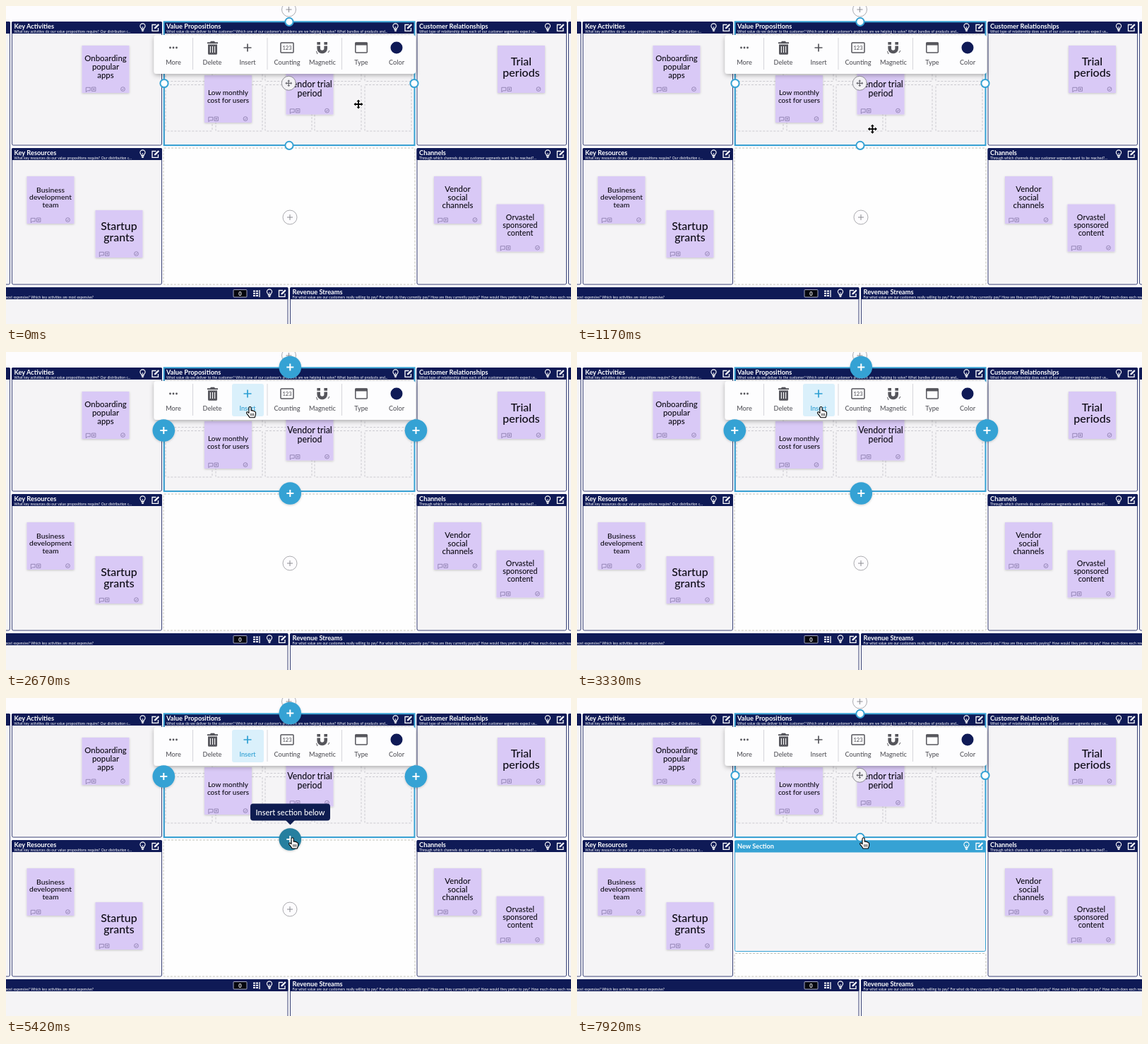
Animation, 800 px wide and 450 px high, one loop 8 s. Source, as an HTML page:

```html
<!DOCTYPE html>
<html lang="en">
<head>
<meta charset="utf-8">
<title>Insert section</title>
<style>
html, body { margin: 0; width: 100%; height: 100%; overflow: hidden; background: #fdfcfe; }
svg { display: block; width: 100vw; height: 100vh; }
text { font-family: Lato, "Open Sans", sans-serif; font-weight: 500; white-space: pre; }
.title { fill: #fff; font-weight: 700; }
.sub { fill: #fff; font-weight: 400; word-spacing: .05em; }
</style>
</head>
<body>
<svg id="stage" viewBox="0 0 800 450">
  <defs>
    <filter id="soft" x="-20%" y="-20%" width="140%" height="150%">
      <feDropShadow dx="0" dy="1" stdDeviation="1.5" flood-color="#000" flood-opacity=".2"/>
    </filter>
    <filter id="bar" x="-5%" y="-20%" width="110%" height="160%">
      <feDropShadow dx="0" dy="2" stdDeviation="3" flood-color="#000" flood-opacity=".3"/>
    </filter>
    <g id="bulb" fill="none" stroke="#fff" stroke-width="1.1">
      <path d="M-1.8 2V.9C-3 0-3.6-1-3.6-2a3.6 3.6 0 0 1 7.2 0C3.6-1 3 0 1.8.9V2Z"/>
      <path d="M-1.8 3.4h3.6M-1.2 4.9h2.4M0 1v-2.2"/>
    </g>
    <g id="edit" fill="none" stroke="#fff" stroke-width="1.3">
      <path d="M1-4H-4.5V4.8H4V.5"/>
      <path d="M-1.7 2.1-1.2-.3 4-5.3 5.6-3.7.6 1.5Z" fill="#fff" stroke="none"/>
    </g>
    <g id="marks" fill="none" stroke="#8677a8" stroke-width=".8">
      <path d="M5.8 59.3h6v4.5H8L5.8 65.6Z"/>
      <path d="M14 59h5.4v5.4H14ZM16.7 60.4v2.6M15.4 61.7H18"/>
      <circle cx="58" cy="61.6" r="2.9"/>
      <path d="M56.6 61.6l1 1.1 1.8-2.1"/>
    </g>
    <g id="hand">
      <path d="M-1.6 9V1.6a1.6 1.6 0 0 1 3.2 0V5.5Q3.2 4.5 4 5.9 5.7 5.2 6.2 6.8 8 6.7 8 8.5V11Q7.6 13 6.6 15.2H-.5Q-2 12.5-4.6 9.6-5.5 7.8-4 7.3-2.8 7.3-1.6 9Z"
        fill="#fff" stroke="#000" stroke-width="1.1" stroke-linejoin="round"/>
      <path d="M1.2 9.3v3.6M3.2 9.3v3.6M5.2 9.3v3.6" stroke="#000" stroke-width=".8"/>
    </g>
    <path id="cross" d="M0-6.6 2.6-3.7H.9V-.9H3.7V-2.6L6.6 0 3.7 2.6V.9H.9V3.7H2.6L0 6.6-2.6 3.7H-.9V.9H-3.7V2.6L-6.6 0-3.7-2.6V-.9H-.9V-3.7H-2.6Z"
      stroke-linejoin="round"/>
  </defs>
</svg>
<script>
const LOOP = 8000, STEP = 1000 / 12;
const NAVY = '#0f1a56', EDGE = '#3a4377', BLUE = '#36a2d4', DARK = '#257f9f', GRAY = '#56565c', PANEL = '#f5f4f6';
const BUTTONS_IN = 2500, CLICK = 6950, SECTION_IN = 7240;

const stage = document.getElementById('stage');
const $ = id => document.getElementById(id);

const text = (x, y, s, size, extra = '') =>
  `<text x="${x}" y="${y}" font-size="${size}" ${extra}>${s}</text>`;
const rect = (x, y, w, h, fill, extra = '') =>
  `<rect x="${x}" y="${y}" width="${w}" height="${h}" fill="${fill}" ${extra}/>`;
const use = (id, x, y, extra = '') => `<use href="#${id}" x="${x}" y="${y}" ${extra}/>`;
const plus = (x, y, r, color, w) =>
  `<path d="M${x - r} ${y}h${2 * r}M${x} ${y - r}v${2 * r}" stroke="${color}" stroke-width="${w}"/>`;
const dashed = (x, y, w, h, fill = 'none', color = '#cbcad0') =>
  rect(x, y, w, h, fill, `stroke="${color}" stroke-dasharray="3 2" rx="1"`);

function panel(x, y, w, h, title, sub, color = NAVY, edge = EDGE) {
  return rect(x, y, w, h, PANEL, `stroke="${edge}" rx="2"`) +
    rect(x - .5, y - .5, w + 1, 17, color, 'rx="1.5"') +
    text(x + 3, y + 9.2, title, 9.3, 'class="title"') +
    text(x + 3, y + 15.2, sub, 5.05, 'class="sub"');
}
const tools = (x, y) => use('bulb', x, y) + use('edit', x + 18, y);

function sticky(x, y, size, base, lead, ...lines) {
  return rect(x, y, 67, 67, '#d9c9f6', 'filter="url(#soft)"') + use('marks', x, y) +
    lines.map((s, i) => text(x + 33.5, base + i * lead, s, size, 'text-anchor="middle" fill="#0c0a14"')).join('');
}

function addCircle(x, y) {
  return `<circle cx="${x}" cy="${y}" r="10" fill="#fdfcfe" stroke="#a3a3a8" stroke-width=".9"/>` +
    plus(x, y, 4, '#8c8c92', 1);
}

function board() {
  const cells = [226, 297, 367, 437, 508].map(x => dashed(x, 41, 66, 65.5) + dashed(x, 111.5, 66, 65.5)).join('');
  return addCircle(400.5, 5) +
    panel(-200, 22.5, 205.5, 371.5, '', '') + panel(796.5, 22.5, 200, 371.5, '', '') +
    panel(8.5, 22.5, 212, 174.5, 'Key Activities', 'What key activities do our value propositions require? Our distribution c...') +
    panel(582, 22.5, 211.5, 174.5, 'Customer Relationships', 'What type of relationship does each of our customer segments expect us...') +
    panel(8.5, 201.5, 212, 192.5, 'Key Resources', 'What key resources do our value propositions require? Our distribution c...') +
    panel(582, 201.5, 211.5, 192.5, 'Channels', 'Through which channels do our customer segments want to be reached?...') +
    panel(-200, 398.5, 599, 90, '', '') +
    text(124, 413.7, 'What are the most important costs? Which key resources are most expensive? Which key activities are most expensive?', 4.9, 'class="sub" text-anchor="end"') +
    panel(402.5, 398.5, 600, 90, 'Revenue Streams', 'For what value are our customers really willing to pay? For what do they currently pay? How are they currently paying? How would they prefer to pay? How much does each revenue stream contribute?') +
    rect(322, 401.5, 19, 10.5, '#05070f', 'stroke="#c9cbe0" stroke-width=".8" rx="1"') +
    text(331.5, 409.7, '0', 7.5, 'class="title" text-anchor="middle"') +
    '<path d="M350 402.5h3v2h-3ZM354 402.5h3v2h-3ZM350 405.7h3v2h-3ZM354 405.7h3v2h-3ZM350 409h3v2h-3ZM354 409h3v2h-3Z" fill="#fff"/>' +
    '<path d="M359 402v10" stroke="#fff" stroke-width="1.3"/>' +
    tools(373, 406.5) + tools(193.5, 30.5) + tools(767, 30.5) + tools(193.5, 209.5) + tools(767, 209.5) +
    `<g id="empty">${dashed(223, 201, 356, 193, '#fefefe', '#c4c4b8')}${addCircle(402, 299)}</g>` +
    `<g id="fresh">${dashed(223, 361.5, 356, 32.5, '#fefefe', '#c4c4b8')}${panel(223.5, 202, 355, 156.5, '', '', BLUE, BLUE)}` +
    text(227, 213.2, 'New Section', 9.2, 'class="title"') + tools(551.5, 209.5) + '</g>' +
    panel(224, 22.5, 354.5, 174.5, 'Value Propositions', "What value do we deliver to the customer? Which one of our customer's problems are we helping to solve? What bundles of products and...") +
    tools(551.5, 30.5) + cells +
    rect(223.7, 22.3, 354.8, 174.8, 'none', `stroke="${BLUE}" stroke-width="2"`) +
    sticky(107.5, 56, 11.4, 77.6, 12.1, 'Onboarding', 'popular', 'apps') +
    sticky(696, 56, 16, 84, 16, 'Trial', 'periods') +
    sticky(281, 98, 10, 126.4, 10.4, 'Low monthly', 'cost for users') +
    sticky(396.5, 86.5, 12.4, 114.7, 12.8, 'Vendor trial', 'period') +
    sticky(29.5, 241, 10.4, 263.8, 10.4, 'Business', 'development', 'team') +
    sticky(126.5, 289, 15.9, 316.7, 15.8, 'Startup', 'grants') +
    sticky(606, 241, 11.4, 263.1, 11.6, 'Vendor', 'social', 'channels') +
    sticky(694.5, 280.5, 10.8, 303.2, 10.8, 'Orvastel', 'sponsored', 'content') +
    '<path id="arrows" d="M392.5 111v19l-9-9.5ZM467.5 111v19l9-9.5Z" fill="#c6c5cb"/>';
}

function toolbar() {
  const label = (x, s, extra = '') => text(x, 83.3, s, 9.2, `text-anchor="middle" ${extra}`);
  const dots = [232.5, 237, 241.5].map(x => `<circle cx="${x}" cy="59" r="1.4"/>`).join('');
  return rect(209.5, 41, 370.5, 55, '#fdfdfe', 'rx="4" filter="url(#bar)"') +
    '<path d="M264.5 45v45M370 45v45M475.5 45v45" stroke="#d5d5da"/>' +
    rect(320, 45, 45, 46, '#daf0fb', 'id="glow" rx="3"') +
    `<g fill="${GRAY}">${dots}
      <path d="M285 51.2h4l1-1.4h5l1 1.4h4v2h-15ZM286 54.6h13v12.6q0 1.6-1.6 1.6h-9.8q-1.6 0-1.6-1.6Z"/>
      <path d="M289.4 57v9M292.5 57v9M295.6 57v9" stroke="#fdfdfe" stroke-width="1.1"/>
      <rect x="389" y="52" width="18" height="14" rx="1" fill="none" stroke="${GRAY}" stroke-width="1.5"/>
      ${text(398, 62, '123', 7.6, 'text-anchor="middle" font-weight="700"')}
      <path d="M442.7 56.5V60a5 5 0 0 0 10 0V56.5" fill="none" stroke="${GRAY}" stroke-width="4.6"/>
      <path d="M440.4 51h4.6v3.8h-4.6ZM450.4 51h4.6v3.8h-4.6Z"/>
      <path d="M441 68l-1.5-4M456 66l2-3" stroke="${GRAY}"/>
      <rect x="494.8" y="52" width="16.5" height="14" rx="1" fill="none" stroke="${GRAY}" stroke-width="1.5"/>
      <path d="M494.5 51.5h17v4h-17Z"/>
      <circle cx="553" cy="59" r="8.5" fill="${NAVY}"/>
      ${label(237, 'More')}${label(292, 'Delete')}${label(398, 'Counting')}
      ${label(448, 'Magnetic')}${label(503, 'Type')}${label(553, 'Color')}</g>` +
    `<g id="insert">${plus(342, 59, 5.5, 'currentColor', 1.7)}${label(342, 'Insert', 'fill="currentColor"')}</g>`;
}

function handles() {
  const dots = [[401, 22.3], [224, 109.5], [578, 109.5], [401, 197.3]]
    .map(([x, y]) => `<circle cx="${x}" cy="${y}" r="5.6" fill="#fff" stroke="${BLUE}" stroke-width="2"/>`).join('');
  return `<g id="handles">${dots}
    <circle cx="400.3" cy="109.3" r="10" fill="#f3f2f5" stroke="#8e8e94"/>
    <use href="#cross" transform="translate(400.3 109.3) scale(.75)" fill="#6b6b72"/></g>`;
}

const spots = [[402.3, 21.5], [223.3, 111], [580.5, 111], [402.3, 200]];
const adders = () => spots.map(([x, y], i) =>
  `<g id="add${i}"><circle r="15.8" fill="${BLUE}" filter="url(#soft)"/>${plus(0, 0, 5, '#fff', 2)}</g>`).join('');

// dir 1: bubble above its anchor, pointing down; -1: below, pointing up
function tip(id, x, w, s, dir) {
  return `<g id="${id}">` + rect(x - w / 2, -12, w, 24, '#0e1c50', 'rx="4"') +
    `<path d="M${x - 6.5} ${11.5 * dir}h13l-6.5 ${6.5 * dir}Z" fill="#0e1c50"/>` +
    text(x, 4, s, 11, 'fill="#fff" text-anchor="middle"') + '</g>';
}

stage.insertAdjacentHTML('beforeend', board() + toolbar() + handles() + adders() +
  tip('assign', 453.5, 81, 'Assign a Task', -1) +
  tip('below', 402.5, 113, 'Insert section below', 1) +
  '<g id="cursor"><use id="asHand" href="#hand"/><use id="asMove" href="#cross" fill="#000" stroke="#fff" stroke-width="1.6" paint-order="stroke"/></g>');

const clamp = v => Math.max(0, Math.min(1, v));
const ease = v => v * v * (3 - 2 * v);
const ramp = (t, from, span) => clamp((t - from) / span);
const show = (id, on) => $(id).setAttribute('display', on ? 'inline' : 'none');

// time, x, y of the pointer
const path = [
  [0, 499, 139], [80, 499, 139], [330, 505, 145], [500, 505, 145], [740, 456.5, 150.5], [900, 456.5, 150.5],
  [1250, 412, 178], [1330, 412, 178], [1650, 345.5, 77.5], [4380, 345.5, 77.5], [5180, 405.6, 197.8], [LOOP, 405.6, 197.8]
];
function pointer(t) {
  const i = path.findIndex(p => p[0] > t);
  const [t0, x0, y0] = path[i - 1], [t1, x1, y1] = path[i];
  const k = ease((t - t0) / (t1 - t0));
  return [x0 + (x1 - x0) * k, y0 + (y1 - y0) * k];
}

function bubble(id, y, dir, alpha) {
  $(id).setAttribute('transform', `translate(0 ${y + dir * 13 * (1 - alpha)})`);
  $(id).setAttribute('opacity', alpha);
}

function draw(t) {
  const [x, y] = pointer(t);
  const adding = t >= BUTTONS_IN && t < SECTION_IN;
  const onNote = x > 396 && x < 463 && y > 96 && y < 153.5;
  const onCheck = onNote && x > 448 && y > 142;
  const onBar = y < 96;
  const onInsert = onBar && x > 320 && x < 365;
  const onAdder = t > 4380 && Math.hypot(x - spots[3][0], y - spots[3][1]) < 16;

  show('arrows', onNote);
  show('glow', onInsert || adding);
  $('insert').setAttribute('color', onInsert || adding ? '#2d9fd3' : GRAY);
  show('handles', !adding);
  const grow = ease(ramp(t, BUTTONS_IN - STEP, 2 * STEP));
  spots.forEach(([bx, by], i) => {
    show('add' + i, adding);
    $('add' + i).setAttribute('transform', `translate(${bx} ${by}) scale(${grow})`);
  });
  $('add3').firstChild.setAttribute('fill', onAdder ? DARK : BLUE);

  bubble('assign', 170.5, -1, Math.min(ramp(t, 700, 170), 1 - ramp(t, 960, 170)));
  bubble('below', 161.5, 1, Math.min(ramp(t, 5210, 170), 1 - ramp(t, CLICK, 170)));

  show('empty', t < SECTION_IN);
  show('fresh', t >= SECTION_IN);

  const hand = onBar || onCheck || onAdder;
  show('asHand', hand);
  show('asMove', !hand);
  $('cursor').setAttribute('transform', `translate(${x} ${y})`);
}

function tick() {
  const t = performance.now() % LOOP;
  draw(Math.min(95, Math.floor((t + 5) / STEP)) * STEP);
  requestAnimationFrame(tick);
}
tick();
</script>
</body>
</html>
```
